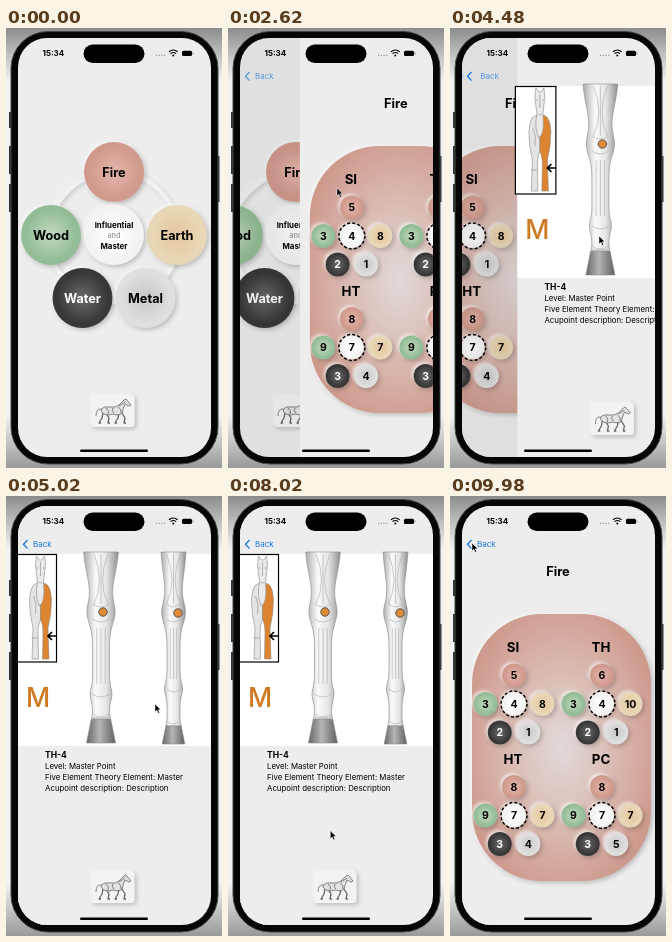
Write an HTML page that moves like this. It is 216 px wide and 440 px high and loops after 10 s.

```html
<!DOCTYPE html>
<html lang="en">
<head>
<meta charset="utf-8">
<style>
  html, body { margin: 0; width: 100%; height: 100%; overflow: hidden; background: #f4f4f4; }
  svg { display: block; width: 216px; height: 440px; font-family: Inter, Roboto, sans-serif; }
  .bold { font-weight: 700; }
  .medium { font-weight: 500; }
  .mid { text-anchor: middle; }
  .raised { filter: drop-shadow(-1.5px -1.5px 1.5px #fff9) drop-shadow(2px 2.5px 2px #0003); }
</style>
</head>
<body>
<svg viewBox="0 0 216 440">
  <defs id="defs">
    <clipPath id="screen"><rect x="12" y="10" width="193" height="419" rx="29"/></clipPath>
    <linearGradient id="backdrop" x2="0" y2="1">
      <stop offset="0" stop-color="#8c8c8c"/><stop offset=".12" stop-color="#f2f2f2"/>
      <stop offset=".88" stop-color="#f2f2f2"/><stop offset="1" stop-color="#999"/>
    </linearGradient>
    <linearGradient id="bone">
      <stop offset="0" stop-color="#aaa"/><stop offset=".35" stop-color="#fafafa"/>
      <stop offset=".65" stop-color="#e6e6e6"/><stop offset="1" stop-color="#909090"/>
    </linearGradient>
    <linearGradient id="hoof">
      <stop offset="0" stop-color="#666"/><stop offset=".45" stop-color="#b5b5b5"/><stop offset="1" stop-color="#606060"/>
    </linearGradient>
    <radialGradient id="panel" r=".62">
      <stop offset="0" stop-color="#e0dad9"/><stop offset=".4" stop-color="#dbc0b9"/>
      <stop offset=".8" stop-color="#d2a296"/><stop offset="1" stop-color="#c99485"/>
    </radialGradient>
  </defs>

  <rect width="216" height="440" fill="url(#backdrop)"/>
  <path d="M4 84v16M4 118v28M4 156v28M212.500 128v46" stroke="#333" stroke-width="2"/>
  <rect x="5" y="3.500" width="207" height="432.500" rx="37" fill="#060606" stroke="#444"/>

  <g clip-path="url(#screen)">
    <g id="home"></g>
    <g id="fire"></g>
    <g id="detail"></g>
    <g fill="#1677dc" font-size="8">
      <path id="chevron" d="M21.500 44l-4 4.300 4 4.300" fill="none" stroke="#1677dc" stroke-width="1.300"/>
      <text id="backHome" x="27" y="51.200">Back</text>
      <text id="backFire" x="27" y="51.200">Back</text>
    </g>
    <text class="bold" x="36.500" y="28" font-size="8">15:34</text>
    <rect x="77.500" y="16.500" width="61" height="18.500" rx="9.250"/>
    <path d="M150 27.300h10" stroke="#999" stroke-width="1.200" stroke-dasharray="1.200 1.500"/>
    <path d="M163 23.800q4.300-3.600 8.600 0M164.500 25.600q2.800-2.200 5.600 0" fill="none" stroke="#000" stroke-width="1.200"/>
    <circle cx="167.300" cy="27.400" r="1"/>
    <rect x="176" y="22.700" width="10" height="5.400" rx="1.500"/>
    <path d="M187 24.500v2" stroke="#888"/>
    <rect x="74" y="421.500" width="68" height="2.400" rx="1.200"/>
  </g>
  <path id="cursor" d="M0 0v8l1.900-1.700 1.300 3 1.400-.6-1.300-2.900h2.500z" stroke="#fff" stroke-width=".5"/>
</svg>

<script>
const $ = id => document.getElementById(id);
const LEFT = 12, WIDTH = 193, PARALLAX = 58, LOOP = 10000;

// Colours and place around the hub, in units of the ring radius.
const elements = {
  Fire: { inner: '#e3b3a7', outer: '#d09a8d', at: [0, -1] },
  Wood: { inner: '#bdd6bd', outer: '#93bd96', at: [-1, 0] },
  Earth: { inner: '#e5c8a0', outer: '#e8d7b6', at: [1, 0] },
  Water: { inner: '#646464', outer: '#383838', at: [-.5, 1], ink: '#fff' },
  Metal: { inner: '#cacaca', outer: '#dfdfdf', at: [.5, 1] },
  Hub: { inner: '#fff', outer: '#f3f3f3', at: [0, 0] }
};
const names = Object.keys(elements);

$('defs').innerHTML += names.map(name => `<radialGradient id="${name}">
  <stop offset=".1" stop-color="${elements[name].inner}"/>
  <stop offset=".85" stop-color="${elements[name].outer}"/></radialGradient>`).join('');

const text = (x, y, size, str, cls = 'bold mid', fill = '#000') =>
  `<text x="${x}" y="${y}" font-size="${size}" class="${cls}" fill="${fill}">${str}</text>`;

// All six balls around (x, y); labels follow the order of names.
const wheel = (x, y, ring, r, size, labels) => names.map((name, i) => {
  const { at, ink } = elements[name], cx = x + at[0] * ring, cy = y + at[1] * ring;
  return `<circle class="raised" cx="${cx}" cy="${cy}" r="${r}" fill="url(#${name})"/>` +
    text(cx, cy + size * .36, size, labels[i], 'bold mid', ink);
}).join('');

const cover = attrs => `<rect x="${LEFT}" width="${WIDTH + 2}" height="440" ${attrs}/>`;
const page = body => cover('fill="#ededed"') + body + cover('class="shade" opacity="0"');

const horseButton = y => `<g transform="translate(107 ${y})">
  <rect class="raised" x="-21.500" y="-16" width="43" height="32" rx="3" fill="#f3f3f3"/>
  <g fill="#e2e2e2" stroke="#666" stroke-width=".8" stroke-linejoin="round">
    <path fill="none" d="M-11-2Q-17-3-17 5"/>
    ${[-10, -7, 6, 9].map((x, i) => `<path fill="none" stroke-width="1.300" d="M${x} 2l${i % 2 ? 3 : -1} 5l${i % 2 ? -1 : -3} 5h2"/>`).join('')}
    <path d="M-12 0Q-11-5-4-4Q3-3 6-6L11-11L13-12L18-6L16-5L12-7Q10-2 9 2Q6 5 0 3Q-8 6-12 0Z"/>
    <path fill="none" d="M-7-3q4 3 2 6M0-3q-2 3 1 5M5-4q4 2 3 6M6-5l6-4"/>
  </g></g>`;

const bump = (y, centre, spread) => Math.exp(-(((y - centre) / spread) ** 2));

// A lower leg: shaft swollen at top, knee and fetlock, ending in a flared hoof.
function leg(x, shaft, top, fetlock, hoofY) {
  const half = y => shaft + top * bump(y, 50, 40) + 5 * bump(y, 117, 15) + 2.5 * bump(y, fetlock, 9) +
    Math.max(0, y - hoofY + 6) * .2;
  const tube = (from, to, fill) => {
    let left = '', right = '';
    for (let y = from; y <= to; y += 2) {
      left += `L${x - half(y)} ${y}`;
      right = `L${x + half(y)} ${y}` + right;
    }
    return `<path fill="url(#${fill})" d="M${left.slice(1)}${right}Z"/>`;
  };
  const tendons = [-.5, 0, .5].map(k =>
    `M${x + k * 14} 58Q${x - k * 8} 85 ${x + k * 14} 108M${x + k * shaft} 132V${fetlock - 10}`).join('');
  const joints = [108, 123, fetlock, hoofY - 5].map(y => `M${x - shaft} ${y}q${shaft} 6 ${shaft * 2} 0`).join('');
  return `<g stroke="#888" stroke-width=".6">${tube(56, hoofY, 'bone')}${tube(hoofY, 248, 'hoof')}
    <path fill="none" stroke="#aaa" d="${tendons}${joints}"/></g>`;
}
const point = (x, y) => `<circle cx="${x}" cy="${y}" r="4.200" fill="#e08a35" stroke="#555"/>`;

const halfHorse = side => `<path transform="scale(${side} 1)" fill="${side > 0 ? '#dc8430' : '#e4e4e4'}"
  d="M0 30Q10 26 11 46Q11 60 7.500 74L8.500 105H2L2.500 78Q2 68 0 66Z"/>`;

const frontView = `<rect x="10" y="58.500" width="40.500" height="107.500" fill="#fff" stroke="#000" stroke-width="1.200"/>
  <g transform="translate(34.500 58)" stroke="#888" stroke-width=".6">
    ${halfHorse(-1)}${halfHorse(1)}
    <path fill="#eaeaea" d="M-5 11L-4 2L-1 6H1L4 2L5 11L3 28Q5 48-1 52Q-6 42-3 28Z"/>
    <path fill="none" d="M0 8V22M-3 13v2M3 13v2M-2 28q2 2 4 0M-9 84h6M-7 42q4 8 2 18"/>
  </g>
  <path d="M51 140H43M46 136L42 140L46 144" fill="none" stroke="#000" stroke-width="1.700"/>`;

$('home').innerHTML = page(
  '<circle class="raised" cx="108" cy="209" r="65" fill="none" stroke="#f3f3f3" stroke-width="4" opacity=".7"/>' +
  wheel(108, 207, 63, 30, 12.7, [...names.slice(0, 5), '']) +
  text(108, 200, 7.9, 'Influential') + text(108, 210, 7.5, 'and', 'mid', '#888') + text(108, 220.5, 7.9, 'Master') +
  horseButton(383));

const group = ([name, ...labels], i) => {
  const x = 64 + 88 * (i % 2), y = 208 + 111.5 * (i >> 1);
  return text(x - 1, y - 52, 13.3, name) + wheel(x, y, 28.5, 12, 10.5, labels) +
    `<circle cx="${x}" cy="${y}" r="13" fill="none" stroke="#000" stroke-width="1.500" stroke-dasharray="3 2.100"/>`;
};

$('fire').innerHTML = page(
  text(108, 79.5, 12.8, 'Fire') +
  '<rect class="raised" x="22" y="118" width="179" height="267" rx="70" fill="url(#panel)"/>' +
  ['SI 5 3 8 2 1 4', 'TH 6 3 10 2 1 4', 'HT 8 9 7 3 4 7', 'PC 8 9 7 3 5 7']
    .map((row, i) => group(row.split(' '), i)).join(''));

$('detail').innerHTML = page(
  `<rect x="${LEFT}" y="58" width="${WIDTH + 2}" height="192" fill="#fff"/>` + frontView +
  text(32, 211, 26.5, 'M', 'mid medium', '#cf7a22') +
  leg(95, 8.5, 9, 198, 223) + point(97, 116) +
  leg(167.5, 6.5, 6, 193, 230) + point(172, 117) +
  text(39, 262, 8.5, 'TH-4', 'bold') +
  ['Level: Master Point', 'Five Element Theory Element: Master', 'Acupoint description: Description']
    .map((line, i) => text(39, 273 + i * 10.8, 7.83, line, '')).join('') +
  horseButton(391));

// Critically damped spring, 0 to 1, starting at ms = 0.
const spring = ms => {
  const k = Math.max(0, ms) * .01826;
  return 1 - (1 + k) * Math.exp(-k);
};

const smooth = u => (u = Math.min(1, Math.max(0, u)), u * u * (3 - 2 * u));

// Pointer stops as [arrival, x, y]; each move takes the same time.
const GLIDE = 900;
const stops = [[0, 222, 270], [2400, 109, 160], [3620, 136, 176], [4250, 149, 208], [6300, 117, 387], [8700, 20, 41], [9600, 22, 47]];
const pointer = t => stops.reduce(([x, y], [arrival, toX, toY]) => {
  const u = smooth((t - arrival) / GLIDE + 1);
  return [x + (toX - x) * u, y + (toY - y) * u];
}, [0, 0]);

const place = (id, x, y = 0) => $(id).setAttribute('transform', `translate(${x} ${y})`);
const fade = (el, opacity) => el.setAttribute('opacity', opacity);

function draw(now) {
  const t = now % LOOP;
  const toFire = spring(t - 2490);
  const toDetail = spring(t - 4344) - spring(t - 8860);

  place('home', -PARALLAX * toFire);
  place('fire', WIDTH * (1 - toFire) - PARALLAX * toDetail);
  place('detail', WIDTH * (1 - toDetail));
  fade($('home').querySelector('.shade'), toFire * .08);
  fade($('fire').querySelector('.shade'), toDetail * .08);
  $('detail').style.display = toDetail > .001 ? '' : 'none';

  fade($('chevron'), toFire);
  place('backHome', -44 * toDetail);
  fade($('backHome'), toFire * (1 - toDetail));
  place('backFire', 11 * (1 - toDetail));
  fade($('backFire'), toDetail);
  place('cursor', ...pointer(t));
  requestAnimationFrame(draw);
}
requestAnimationFrame(draw);
</script>
</body>
</html>
```
